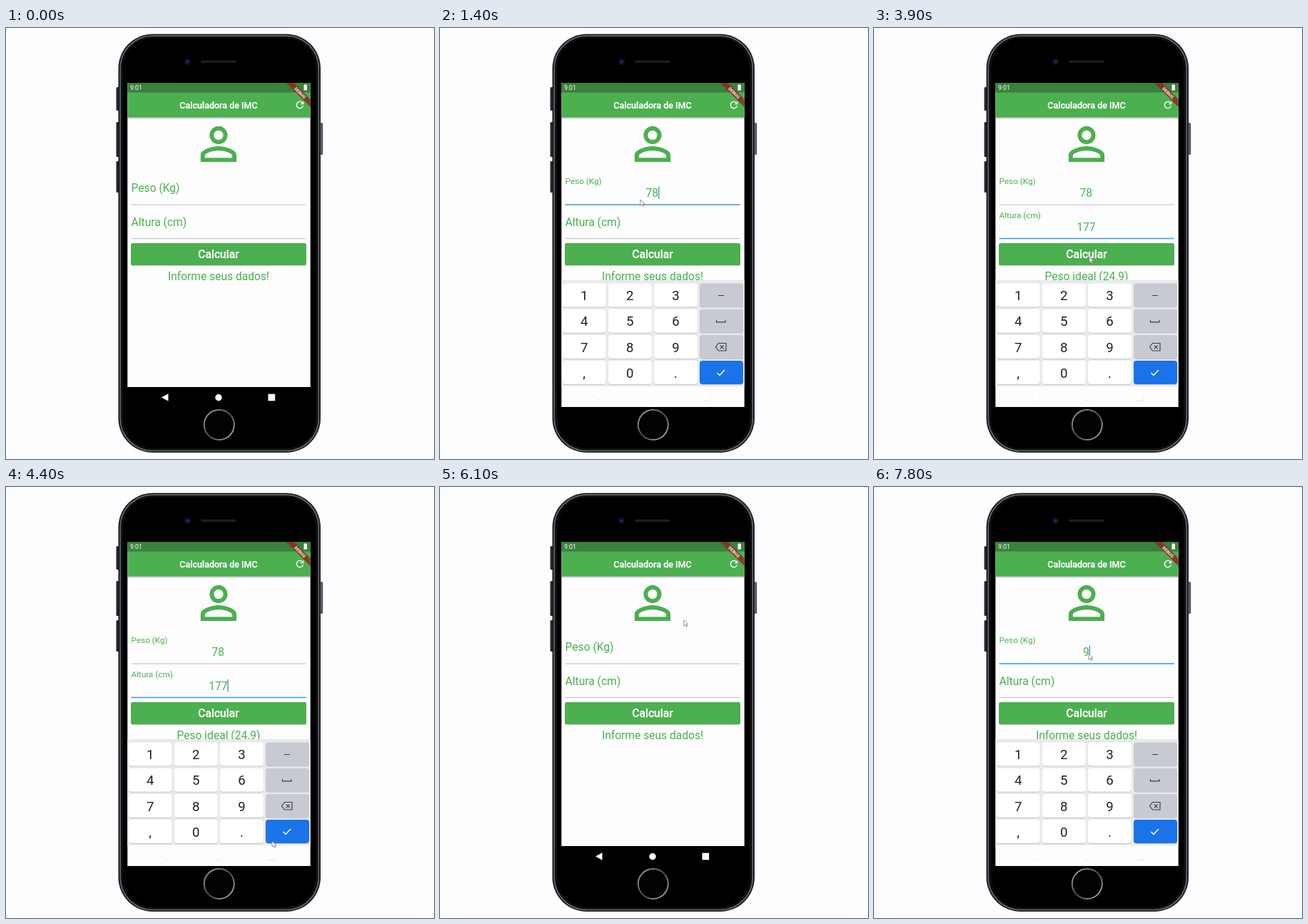
An HTML page for the animation above (8000 ms loop, 600 by 605 pixels).

```html
<!DOCTYPE html>
<html lang="pt">
<head>
<meta charset="utf-8">
<title>Calculadora de IMC</title>
<style>
html, body { margin: 0; width: 100%; height: 100%; overflow: hidden; background: #fdfcfe; }
svg { display: block; width: 600px; height: 605px; }
text { font-family: Roboto, sans-serif; }
.big { font-size: 15.6px; fill: #4caf50; }
.mid { text-anchor: middle; }
.key { font-size: 18.6px; fill: #202124; text-anchor: middle; }
.med { font-weight: 500; fill: #fff; stroke: #fff; stroke-width: .25px; }
</style>
</head>
<body>
<svg viewBox="0 0 600 605">
  <defs>
    <clipPath id="screen"><rect x="170.300" y="77" width="256.400" height="455"/></clipPath>
    <linearGradient id="shade" x1="0" y1="0" x2="0" y2="1">
      <stop offset="0" stop-color="#000" stop-opacity=".3"/>
      <stop offset="1" stop-color="#000" stop-opacity="0"/>
    </linearGradient>
    <linearGradient id="ring" x1="0" y1="0" x2="1" y2="1">
      <stop offset="0" stop-color="#a6a8ac"/>
      <stop offset=".5" stop-color="#4a4c50"/>
      <stop offset="1" stop-color="#b4b6ba"/>
    </linearGradient>
    <linearGradient id="side">
      <stop offset="0" stop-color="#17181c"/>
      <stop offset=".6" stop-color="#75787e"/>
      <stop offset="1" stop-color="#25272b"/>
    </linearGradient>
  </defs>

  <!-- phone -->
  <g fill="#24262b">
    <rect x="154.500" y="83" width="6" height="33" rx="1.500"/>
    <rect x="154.500" y="132" width="6" height="49" rx="1.500"/>
    <rect x="154.500" y="187" width="6" height="44" rx="1.500"/>
    <rect x="438" y="133" width="6" height="45" rx="1.500" fill="url(#side)"/>
  </g>
  <rect x="157.500" y="8.500" width="283.500" height="587.500" rx="48" fill="#17181c"/>
  <rect x="160.300" y="11" width="277.900" height="582.500" rx="45.500" fill="#000" stroke="#5a5d64" stroke-width="2"/>
  <rect x="163.300" y="13.500" width="271.900" height="577.500" rx="43" fill="#000" stroke="#1d1e22"/>
  <circle cx="254.500" cy="47.500" r="4.500" fill="#0c1022"/>
  <circle cx="254.500" cy="47.500" r="2" fill="#1c2b66"/>
  <rect x="273" y="45.500" width="50" height="3.500" rx="1.700" fill="#1e1e20"/>
  <circle cx="298.800" cy="557" r="21" fill="#020202" stroke="url(#ring)" stroke-width="2"/>

  <g clip-path="url(#screen)">
    <rect x="170" y="77" width="257" height="427" fill="#fdfdfe"/>
    <rect x="170" y="125" width="257" height="3" fill="url(#shade)"/>
    <rect x="170" y="77" width="257" height="48.500" fill="#4caf50"/>
    <rect x="170" y="77" width="257" height="13.500" fill="#39813c"/>
    <text x="174" y="87" font-size="8.800" fill="#fff">9:01</text>
    <text x="298" y="112.500" font-size="12.500" class="med mid">Calculadora de IMC</text>
    <path transform="translate(404.100 100.100) scale(.66)" fill="#fff" d="M17.650 6.350C16.200 4.900 14.210 4 12 4c-4.420 0-7.990 3.580-7.990 8s3.570 8 7.990 8c3.730 0 6.840-2.550 7.730-6h-2.080c-.82 2.330-3.040 4-5.650 4-3.310 0-6-2.690-6-6s2.690-6 6-6c1.660 0 3.140.69 4.220 1.780L13 11h7V4l-2.350 2.350z"/>
    <g transform="translate(427 76.500) rotate(45)">
      <rect x="-26" y="17" width="52" height="7.600" fill="#8f2a22" fill-opacity=".85"/>
      <text y="23" font-size="6.200" font-weight="900" fill="#f4e6e4" class="mid">DEBUG</text>
    </g>
    <path d="M417.500 80h1v-1h2v1h1.500v7.500h-4.500z" fill="#fff"/>

    <path transform="translate(260.300 125.300) scale(3.140)" fill="#4caf50" d="M12 5.900c1.160 0 2.100.94 2.100 2.100s-.94 2.100-2.100 2.100S9.900 9.160 9.900 8s.94-2.100 2.100-2.100m0 9c2.970 0 6.100 1.460 6.100 2.100v1.100H5.900V17c0-.64 3.130-2.100 6.100-2.100M12 4C9.790 4 8 5.790 8 8s1.790 4 4 4 4-1.790 4-4-1.790-4-4-4zm0 9c-2.670 0-8 1.340-8 4v3h16v-3c0-2.660-5.330-4-8-4z"/>

    <g id="fields"></g>

    <rect x="175" y="303.500" width="246" height="30.500" rx="2.500" fill="#000" opacity=".2"/>
    <rect x="175" y="302" width="246" height="31" rx="2.500" fill="#4caf50"/>
    <text x="298" y="323.300" font-size="15.600" class="med mid">Calcular</text>
    <text id="info" x="298" y="354" class="big mid"></text>

    <rect x="170" y="504" width="257" height="28" fill="#000"/>
    <g id="board">
      <rect x="170" y="354" width="257" height="150" fill="#e8eaed"/>
      <rect x="170" y="503" width="257" height="30" fill="#fdfdfe"/>
      <g id="keys"></g>
      <g fill="none" stroke="#3c4043" stroke-width="1.200">
        <path d="M390 375.500h8"/>
        <path d="M387.500 410v2.800h12.500v-2.800"/>
        <path d="M390.500 442.500h10.500v10.500h-10.500l-4-5.250zM392.800 445.300l5 5m0-5l-5 5"/>
        <path d="M388.500 484l3.500 3.500 7-7.500" stroke="#fff" stroke-width="1.500"/>
      </g>
    </g>
    <g fill="#fff">
      <path d="M218 518.500l9.500-5.300v10.600z"/>
      <circle cx="298" cy="518.700" r="4.700"/>
      <rect x="367.500" y="513.700" width="9.700" height="9.700"/>
    </g>
    <g id="faint" fill="none" stroke="#e9e9ee" stroke-width="1">
      <path d="M219 519.500l8 4.500M294 521.500q4 4 8 0M367.500 523.500h10v-4"/>
    </g>
  </g>

  <path id="mouse" d="M0 0v8.300l2-1.800 1.400 3 1.400-.6-1.400-2.900h2.700z" fill="#fff" stroke="#77787e" stroke-width=".8"/>
</svg>

<script>
const NS = 'http://www.w3.org/2000/svg';
const $ = id => document.getElementById(id);
const LOOP = 8000;

function add(parent, tag, attrs, text) {
  const el = document.createElementNS(NS, tag);
  for (const k in attrs) el.setAttribute(k, attrs[k]);
  if (text) el.textContent = text;
  parent.appendChild(el);
  return el;
}

// keyboard, column four holds the special keys
['123-', '456_', '789<', ',0.!'].forEach((row, r) => [...row].forEach((ch, c) => {
  const x = 171.7 + c * 64.1, y = 358.5 + r * 36.2, size = { x, width: 61, height: 33, rx: 4 };
  const fill = c < 3 ? '#fff' : r < 3 ? '#c8cad1' : '#1a73e8';
  add($('keys'), 'rect', { ...size, y: y + 1, fill: '#000', opacity: .16 });
  add($('keys'), 'rect', { ...size, y, fill });
  if (c < 3) add($('keys'), 'text', { x: x + 30.5, y: y + 23.7, class: 'key' }, ch);
}));

function makeField(label, y) {
  const g = $('fields');
  return {
    y,
    label: add(g, 'text', { class: 'big' }, label),
    value: add(g, 'text', { class: 'big mid', x: 297.3, y: y - 11 }),
    line: add(g, 'rect', { x: 175.5, width: 245 }),
    caret: add(g, 'rect', { y: y - 25.5, width: 1.4, height: 17.5, fill: '#4a98d8' })
  };
}
const weight = makeField('Peso (Kg)', 248);
const height = makeField('Altura (cm)', 295.5);

const clamp = u => Math.max(0, Math.min(1, u));
const ramp = (t, start, len) => clamp((t - start) / len);
const smooth = u => u * u * (3 - 2 * u);
const out = u => 1 - (1 - u) ** 3;

// latest entry of [time, value] pairs
const latest = (list, t) => list.reduce((a, b) => t >= b[0] ? b : a);

const weightText = [[0, ''], [1200, '7'], [1300, '78'], [5500, ''], [7800, '9']];
const heightText = [[0, ''], [3000, '1'], [3200, '17'], [3400, '177'], [5500, '']];
const infoText = [[0, 'Informe seus dados!'], [3800, 'Peso ideal (24.9)'], [5500, 'Informe seus dados!']];
const focus = [[0, null], [600, weight], [2300, height], [4500, null], [6500, weight]];
const caretStart = [0, 600, 1200, 1300, 2300, 3000, 3200, 3400, 6600, 7800];
const path = [
  [100, 335, 565], [550, 281, 241], [1800, 281, 241], [2200, 276, 287], [3500, 276, 287],
  [3700, 300, 317], [3850, 300, 317], [4400, 373, 497], [4650, 373, 497],
  [5200, 402, 141], [5350, 410, 108], [5750, 410, 108], [6350, 301, 234], [8000, 301, 234]
];

function drawField(f, text, up, t) {
  const on = latest(focus, t)[1] === f;
  const s = 1 - .25 * up;
  f.label.setAttribute('transform', `translate(175.6 ${f.y - 18 - 11 * up}) scale(${s})`);
  f.value.textContent = text;
  f.line.setAttribute('y', f.y - (on ? .8 : .4));
  f.line.setAttribute('height', on ? 1.6 : 1);
  f.line.setAttribute('fill', on ? '#4a9ce0' : '#bdbdc6');
  const since = t - Math.max(...caretStart.filter(s => s <= t));
  const blink = since % 1000 < 500;
  f.caret.setAttribute('x', 296.9 + text.length * 4.38 + (text ? .3 : 0));
  f.caret.setAttribute('visibility', on && blink ? 'visible' : 'hidden');
}

function drawMouse(t) {
  $('mouse').setAttribute('visibility', t < 100 ? 'hidden' : 'visible');
  let i = 0;
  while (i < path.length - 2 && t >= path[i + 1][0]) i++;
  const [t0, x0, y0] = path[i], [t1, x1, y1] = path[i + 1];
  const u = smooth(ramp(t, t0, t1 - t0));
  $('mouse').setAttribute('transform', `translate(${x0 + (x1 - x0) * u} ${y0 + (y1 - y0) * u})`);
}

function draw(t) {
  const up1 = smooth(ramp(t, 600, 200)) - smooth(ramp(t, 5500, 200)) + smooth(ramp(t, 6500, 200));
  const up2 = smooth(ramp(t, 2300, 200)) - smooth(ramp(t, 5500, 200));
  drawField(weight, latest(weightText, t)[1], up1, t);
  drawField(height, latest(heightText, t)[1], up2, t);
  $('info').textContent = latest(infoText, t)[1];

  const open = out(ramp(t, 700, 325)) - ramp(t, 4550, 250) ** 2 + out(ramp(t, 6600, 325));
  $('board').setAttribute('transform', `translate(0 ${178 * (1 - open)})`);
  $('board').setAttribute('visibility', open > 0 ? 'visible' : 'hidden');
  $('faint').setAttribute('visibility', open > .98 ? 'visible' : 'hidden');
  drawMouse(t);
}

const start = performance.now();
function tick() {
  draw((performance.now() - start) % LOOP);
  requestAnimationFrame(tick);
}
draw(0);
requestAnimationFrame(tick);
</script>
</body>
</html>
```
